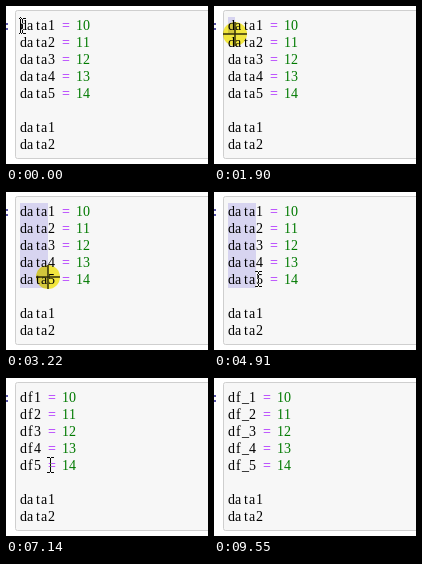
Animation, 202 px wide and 158 px high, one loop 9.75 s. Source, as an HTML page with a canvas:

```html
<!DOCTYPE html>
<html lang="en">
<head>
<meta charset="utf-8">
<title>Column editing</title>
<style>
html, body { margin: 0; width: 100%; height: 100%; overflow: hidden; background: #fff; }
canvas { display: block; width: 202px; height: 158px; }
</style>
</head>
<body>
<canvas id="stage" width="202" height="158"></canvas>
<script>
const ctx = document.getElementById('stage').getContext('2d');
const LOOP = 9750, TICK = 100, LEFT = 14, TOP = 11, CHAR = 7, ROW = 17, ROWS = 5;
const CODE_FONT = '14px "Liberation Serif", "Noto Serif", serif';
const IME_FONT = '500 15px "Noto Sans CJK SC", "Noto Sans CJK JP", sans-serif';

const ALT_DOWN = 800, PRESS = 1700, RELEASE = 4910, COMMIT = 7020, CLICK = 9240, LEAVE = 9550;

// Each edit restarts the caret blink.
const edits = [
  { at: -100, text: 'data' },
  { at: 6220, text: 'd', words: ['的', '都', '到', '_(:з」∠)_'] },
  { at: 6420, text: 'df', words: ['地方', '东方', '得分', '对方'] },
  { at: 7540, text: 'df_' },
  { at: 9050, text: 'df_', done: true }
];

// Pointer glides; each starts where the one before it ended.
const glides = [
  { from: 0, to: 200, x: 14, y: 26 },
  { from: 400, to: 600, x: 14, y: 21 },
  { from: 700, to: 800, x: 12, y: 20 },
  { from: 1100, to: 1200, x: 15, y: 20 },
  { from: 1800, to: 2300, x: 33, y: 41 },
  { from: 2420, to: 3220, x: 42, y: 85 },
  { from: 4810, to: 4910, x: 44, y: 87 },
  { from: 8640, to: 9140, x: 140, y: 106 }
];

const within = (t, a, b) => t >= a && t < b;
const rowY = i => TOP + i * ROW;
const easeOut = p => 1 - (1 - p) ** 2;

function pointerAt(t) {
  let x = 16, y = 20;
  for (const g of glides) {
    if (t < g.from) break;
    const elapsed = Math.floor((t - g.from) / TICK) * TICK;
    const p = easeOut(Math.min(1, elapsed / (g.to - g.from)));
    x += (g.x - x) * p;
    y += (g.y - y) * p;
  }
  return [Math.round(x), Math.round(y)];
}

function rect(x, y, w, h, color) {
  ctx.fillStyle = color;
  ctx.fillRect(x, y, w, h);
}

// Draws text on the character grid and returns the next column.
function type(text, col, row, color) {
  ctx.font = CODE_FONT;
  ctx.fillStyle = color;
  for (const ch of text) {
    const inset = Math.round((CHAR - ctx.measureText(ch).width) / 2);
    ctx.fillText(ch, LEFT + col * CHAR + inset, rowY(row) + 13);
    col++;
  }
  return col;
}

function drawCell() {
  rect(0, 0, 202, 158, '#fff');
  ctx.beginPath();
  ctx.roundRect(9.5, 4.5, 210, 148, 2);
  ctx.fillStyle = '#f7f7f7';
  ctx.fill();
  ctx.strokeStyle = '#cfcfcf';
  ctx.lineWidth = 1;
  ctx.stroke();
  for (const y of [17, 22]) rect(0, y, 2, 2, '#5a55a8');
}

function drawSelection(x, y) {
  const cols = Math.round((x - LEFT) / CHAR);
  const rows = Math.ceil((y - TOP) / ROW - 0.2);
  rect(LEFT, TOP, cols * CHAR, rows * ROW, '#d7d4f0');
}

function drawCode(prefix, composing) {
  const operator = composing ? '#333' : '#a2f';
  const number = composing ? '#111' : '#007a00';
  for (let i = 0; i < ROWS; i++) {
    let col = type(prefix + (i + 1) + ' ', 0, i, '#000');
    col = type('= ', col, i, operator);
    type(String(10 + i), col, i, number);
  }
  type('data1', 0, 6, '#000');
  type('data2', 0, 7, '#000');
}

function drawCarets(t, edit) {
  if ((t - edit.at) % 1000 >= 500 || within(t, PRESS, edits[1].at)) return;
  if (edit === edits[0]) rect(LEFT, TOP, 1, ROW, '#000');
  else if (edit.done) rect(LEFT, rowY(5), 1, ROW, '#000');
  else rect(LEFT + edit.text.length * CHAR, TOP, 1, ROW * ROWS, '#000');
}

function drawIme({ text, words }) {
  for (let i = 0; i < ROWS; i++) rect(LEFT, rowY(i) + 15, text.length * CHAR, 1, '#000');
  rect(20, 23, 182, 67, '#000');
  rect(21, 24, 181, 61, '#fff');
  ctx.font = IME_FONT.replace('500 15px', '13px');
  ctx.fillStyle = '#111';
  ctx.fillText(text, 35, 47);
  rect(Math.round(35 + ctx.measureText(text).width), 34, 1, 16, '#000');
  ctx.font = IME_FONT;
  let x = 35;
  words.forEach((word, i) => {
    const label = (i + 1) + '.' + word;
    ctx.fillStyle = i ? '#000' : '#8c8094';
    ctx.fillText(label, x, 73);
    x += ctx.measureText(label).width + 14.5;
  });
}

function drawHalo(x, y) {
  ctx.globalCompositeOperation = 'multiply';
  ctx.fillStyle = '#f9ee40';
  ctx.beginPath();
  ctx.arc(x, y, 12, 0, Math.PI * 2);
  ctx.fill();
  ctx.globalCompositeOperation = 'source-over';
}

function drawCross(x, y) {
  const ink = 'rgba(50, 46, 8, 0.75)';
  rect(x - 12, y - 1, 24, 2, ink);
  rect(x - 1, y - 12, 2, 24, ink);
}

// The text pointer inverts whatever lies under it.
function drawBeam(x, y) {
  ctx.globalCompositeOperation = 'difference';
  for (const edge of [y - 8, y + 7]) {
    rect(x - 3, edge, 3, 1, '#fff');
    rect(x + 1, edge, 3, 1, '#fff');
  }
  rect(x, y - 7, 1, 14, '#fff');
  ctx.globalCompositeOperation = 'source-over';
}

function draw(t) {
  const [x, y] = pointerAt(t);
  const edit = edits.filter(e => e.at <= t).pop();
  const composing = edit.words && t < COMMIT;
  drawCell();
  if (within(t, PRESS, edits[1].at)) drawSelection(x, y);
  drawCode(edit.text, composing);
  drawCarets(t, edit);
  if (composing) drawIme(edit);
  if (within(t, PRESS, RELEASE) || within(t, CLICK, CLICK + 2 * TICK)) drawHalo(x, y);
  if (within(t, ALT_DOWN, RELEASE)) drawCross(x, y);
  else if (t < LEAVE) drawBeam(x, y);
}

const start = performance.now();
function tick() {
  draw((performance.now() - start) % LOOP);
  requestAnimationFrame(tick);
}
tick();
</script>
</body>
</html>
```
